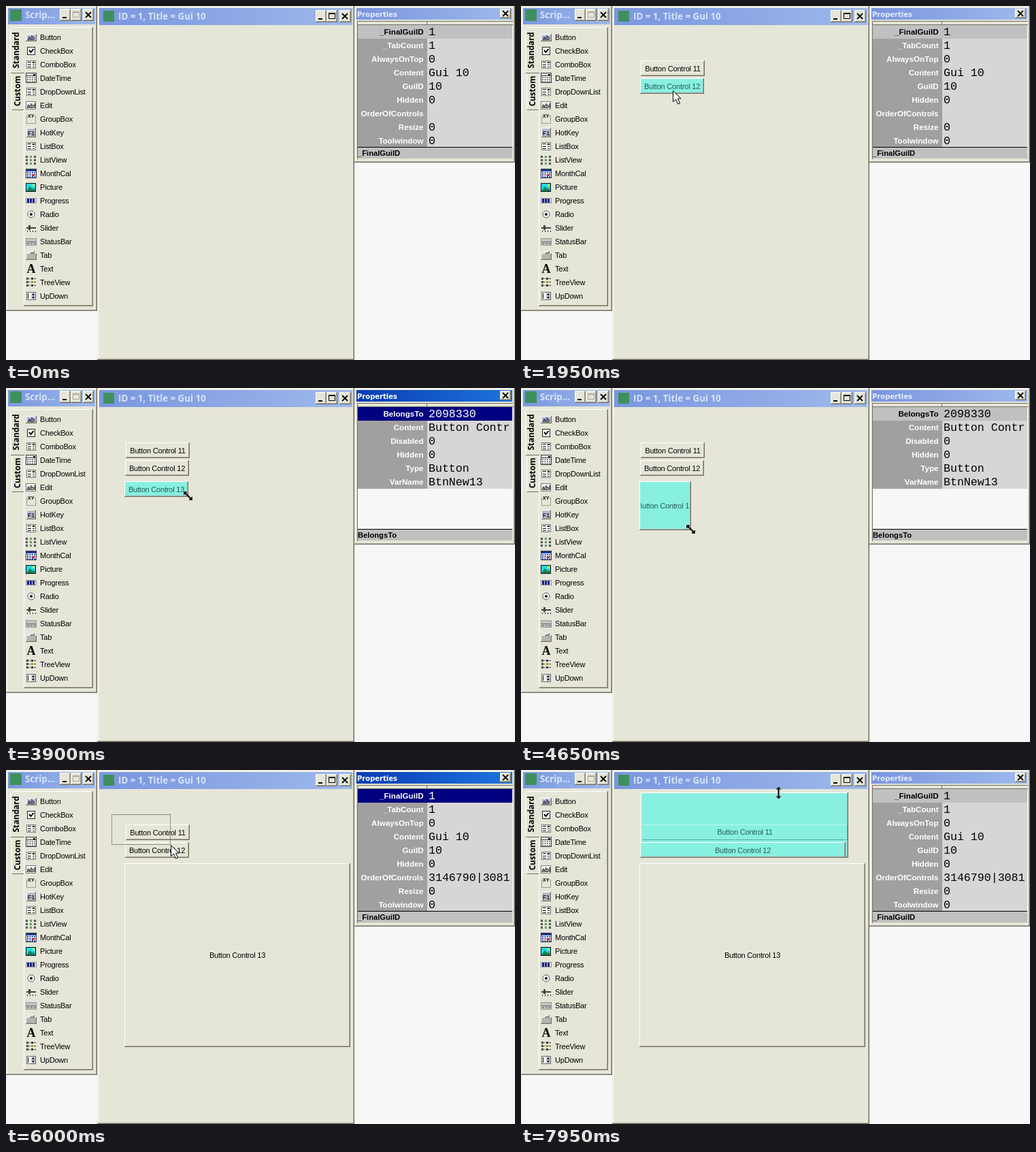
Write an HTML page with a canvas that moves like this. It is 748 px wide and 520 px high and loops after 8 s.

```html
<!DOCTYPE html>
<html lang="en">
<head>
<meta charset="utf-8">
<title>GUI builder</title>
<style>
html, body { margin: 0; width: 100%; height: 100%; overflow: hidden; background: #f7f7f7; }
canvas { display: block; width: 748px; height: 520px; }
</style>
</head>
<body>
<canvas id="stage" width="748" height="520"></canvas>
<script>
const ctx = document.getElementById('stage').getContext('2d');
const LOOP = 8000, STEP = 150;
const FACE = '#e6e6d8', LIGHT = '#fff', SHADE = '#aca899', DARK = '#716f64', CYAN = '#88f0e0';
const UI = '11px "Liberation Sans", sans-serif';
const CAPTION = 'bold 13.3px "Open Sans", sans-serif';
const SMALL = 'bold 10px "DejaVu Sans", sans-serif';
const LABEL = 'bold 11.6px "Liberation Sans", sans-serif';
const MONO = '16.6px "Liberation Mono", monospace';

function rect(x, y, w, h, color) {
  ctx.fillStyle = color;
  ctx.fillRect(x, y, w, h);
}

function frame(x, y, w, h, color) {
  ctx.strokeStyle = color;
  ctx.lineWidth = 1;
  ctx.strokeRect(x + 0.5, y + 0.5, w - 1, h - 1);
}

function text(s, x, y, font, color = '#000', align = 'left', spacing = '0px') {
  ctx.font = font;
  ctx.fillStyle = color;
  ctx.textAlign = align;
  ctx.letterSpacing = spacing;
  ctx.fillText(s, x, y);
}

const uiText = (s, x, y, color, align) => text(s, x, y, UI, color, align, '-0.2px');

function poly(points, fill, stroke) {
  ctx.beginPath();
  points.forEach(([x, y], i) => i ? ctx.lineTo(x, y) : ctx.moveTo(x, y));
  if (fill) { ctx.closePath(); ctx.fillStyle = fill; ctx.fill(); }
  if (stroke) { ctx.strokeStyle = stroke; ctx.lineWidth = 1; ctx.stroke(); }
}

function bevel(x, y, w, h, fill, inner = SHADE) {
  rect(x, y, w, h, DARK);
  rect(x, y, w - 1, h - 1, LIGHT);
  rect(x + 1, y + 1, w - 2, h - 2, inner);
  rect(x + 1, y + 1, w - 3, h - 3, fill);
}

function windowBox(x, y, w, h) {
  rect(x, y, w, h, DARK);
  rect(x, y, w - 1, h - 1, FACE);
  rect(x + 1, y + 1, w - 2, h - 2, SHADE);
  rect(x + 1, y + 1, w - 3, h - 3, LIGHT);
  rect(x + 2, y + 2, w - 4, h - 4, FACE);
}

function caption(x, y, w, h, active) {
  const g = ctx.createLinearGradient(x, 0, x + w, 0);
  g.addColorStop(0, active ? '#0a3cb4' : '#7a96df');
  g.addColorStop(1, active ? '#1c74dc' : '#9db9eb');
  rect(x, y, w, h, g);
}

function captionButton(x, y, w, h, kind, off) {
  bevel(x, y, w, h, FACE);
  const c = off ? SHADE : '#000', cx = x + (w >> 1), cy = y + (h >> 1);
  if (kind === 'min') rect(x + 4, y + h - 6, 6, 2, c);
  if (kind === 'max') {
    frame(cx - 5, cy - 5, 10, 9, c);
    rect(cx - 5, cy - 5, 10, 2, c);
  }
  if (kind === 'close') {
    ctx.lineWidth = 1.8;
    ctx.strokeStyle = c;
    ctx.beginPath();
    ctx.moveTo(cx - 4, cy - 4); ctx.lineTo(cx + 4, cy + 4);
    ctx.moveTo(cx + 4, cy - 4); ctx.lineTo(cx - 4, cy + 4);
    ctx.stroke();
  }
}

// Palette icons, each drawn in a 16 by 16 cell
function combo() {
  rect(1, 2, 14, 12, '#fff'); frame(1, 2, 14, 12, '#777');
  rect(9, 3, 5, 4, FACE); rect(10, 4, 3, 2, '#000');
  for (const y of [4, 8, 11]) rect(3, y, 5, 1, '#000');
  rect(10, 8, 3, 1, '#000'); rect(10, 11, 3, 1, '#000');
}

function grid(header) {
  rect(0, 1, 16, 14, '#fff'); frame(0, 1, 16, 14, '#333');
  rect(1, 2, 14, 3, header);
  for (let r = 0; r < 3; r++)
    for (let c = 0; c < 4; c++) rect(2 + c * 3.4, 6 + r * 3, 2, 2, header);
}

const palette = {
  Button() { bevel(0, 3, 16, 11, '#c4ccdc'); text('ab', 8, 12, 'bold 9px "Liberation Sans", sans-serif', '#113', 'center'); },
  CheckBox() {
    rect(2, 2, 12, 12, '#fff'); frame(2, 2, 12, 12, '#222');
    ctx.lineWidth = 2; ctx.strokeStyle = '#000';
    ctx.beginPath(); ctx.moveTo(5, 7); ctx.lineTo(7.5, 10); ctx.lineTo(11.5, 5); ctx.stroke();
  },
  ComboBox: combo,
  DateTime() { grid('#777'); rect(0, 0, 16, 5, '#ddd'); frame(0, 0, 16, 5, '#444'); rect(11, 2, 3, 2, '#000'); },
  DropDownList: combo,
  Edit() { rect(0, 2, 15, 12, '#fff'); frame(0, 2, 15, 12, '#777'); text('abl', 8, 12, 'bold 9px "Liberation Sans", sans-serif', '#000', 'center'); },
  GroupBox() {
    ctx.setLineDash([1, 1]); frame(1, 3, 14, 12, '#555'); ctx.setLineDash([]);
    rect(3, 0, 9, 6, FACE);
    text('XY', 3, 6, 'bold 7px "Liberation Sans", sans-serif');
  },
  HotKey() { bevel(1, 1, 14, 14, '#b8bcc8'); text('F1', 8, 12, 'bold 9px "Liberation Sans", sans-serif', '#224', 'center'); },
  ListBox: combo,
  ListView() {
    for (let r = 0; r < 3; r++)
      for (let c = 0; c < 3; c++) { rect(c * 6, 2 + r * 5, 3, 3, c === 1 ? '#484' : '#333'); rect(c * 6 + 1, 3 + r * 5, 1, 1, '#fff'); }
  },
  MonthCal() { grid('#1a3c9c'); rect(9, 9, 3, 3, '#d02020'); },
  Picture() {
    rect(0, 2, 15, 13, '#20d8e8'); frame(0, 2, 15, 13, '#111');
    poly([[1, 14], [6, 7], [10, 11], [12, 9], [14, 14]], '#168050');
    rect(10, 4, 3, 3, '#ffe840');
  },
  Progress() { rect(0, 4, 16, 8, '#d4d4d4'); frame(0, 4, 16, 8, '#999'); for (let i = 0; i < 3; i++) rect(2 + i * 4, 5, 3, 6, '#10208c'); },
  Radio() {
    ctx.beginPath(); ctx.arc(8, 8, 5, 0, 7); ctx.fillStyle = '#fff'; ctx.fill();
    ctx.strokeStyle = '#555'; ctx.lineWidth = 1; ctx.stroke();
    ctx.beginPath(); ctx.arc(8, 8, 2, 0, 7); ctx.fillStyle = '#000'; ctx.fill();
  },
  Slider() { rect(1, 7, 14, 2, '#444'); rect(4, 4, 3, 7, '#444'); for (let i = 0; i < 4; i++) rect(2 + i * 4, 12, 1, 2, '#222'); },
  StatusBar() { rect(0, 3, 16, 11, '#c4c4c4'); frame(0, 3, 16, 11, '#999'); rect(1, 8, 14, 1, '#666'); for (let i = 0; i < 3; i++) rect(2 + i * 5, 10, 3, 2, '#888'); },
  Tab() { bevel(0, 5, 16, 10, '#b4b4b4'); bevel(6, 2, 7, 4, '#b4b4b4'); },
  Text() { text('A', 8, 14, 'bold 18px "Liberation Serif", serif', '#000', 'center'); },
  TreeView() {
    for (let i = 0; i < 3; i++) {
      rect(1, 1 + i * 5, 3, 3, '#222'); rect(2, 2 + i * 5, 1, 1, '#fff');
      rect(5, 2 + i * 5, 2, 1, '#555'); rect(8, 1 + i * 5, 3, 3, i === 1 ? '#a90' : '#333'); rect(12, 2 + i * 5, 3, 1, '#333');
    }
  },
  UpDown() {
    rect(1, 2, 14, 12, '#fff'); frame(1, 2, 14, 12, '#666'); rect(3, 4, 1, 8, '#000'); rect(8, 3, 6, 10, '#ccd');
    poly([[9, 7], [13, 7], [11, 4]], '#000'); poly([[9, 9], [13, 9], [11, 12]], '#000');
  }
};

function upright(s, x, y) {
  ctx.save();
  ctx.translate(x, y);
  ctx.rotate(-Math.PI / 2);
  text(s, 0, 0, 'bold 11.7px "Open Sans", sans-serif', '#000', 'center');
  ctx.restore();
}

function drawPalette(active) {
  windowBox(0, 0, 134, 448);
  caption(3, 3, 128, 24, active);
  rect(6, 5, 17, 17, '#3f8f5c');
  text('Scrip...', 28, 18, CAPTION, active ? '#fff' : '#d8e4f8');
  captionButton(79, 4, 16, 18, 'min');
  captionButton(95, 4, 16, 18, 'max', true);
  captionButton(113, 4, 16, 18, 'close');

  bevel(26, 31, 102, 410, FACE);
  for (const [x, y, h, w] of [[8, 98, 55, 18], [6, 31, 68, 21]]) {
    rect(x, y + 1, w, h - 1, FACE);
    rect(x, y + 2, 1, h - 4, LIGHT);
    rect(x + 2, y, w - 2, 1, LIGHT);
    rect(x + 1, y + h - 1, w - 1, 1, DARK);
  }
  upright('Standard', 19, 65);
  upright('Custom', 21, 125);

  Object.entries(palette).forEach(([name, icon], i) => {
    const y = 46 + i * 20;
    ctx.save();
    ctx.translate(29, y - 8);
    icon();
    ctx.restore();
    uiText(name, 50, y + 4);
  });
}

function drawForm() {
  windowBox(134, 0, 378, 520);
  caption(137, 3, 372, 25, false);
  rect(143, 7, 16, 16, '#3f8f5c');
  text('ID = 1, Title = Gui 10', 165, 20, CAPTION, '#d8e4f8');
  captionButton(455, 6, 16, 18, 'min');
  captionButton(471, 6, 16, 18, 'max');
  captionButton(490, 6, 17, 18, 'close');
}

function drawProperties(rows, active, focused) {
  windowBox(512, 0, 236, 230);
  caption(515, 3, 229, 17, active);
  text('Properties', 516, 16, SMALL, active ? '#fff' : '#e4ecfa');
  captionButton(726, 4, 16, 14, 'close');
  rect(516, 22, 229, 186, '#f7f7f7');
  rect(516, 22, 229, 5, FACE);
  rect(516, 22, 229, 1, DARK);
  rect(618, 23, 1, 4, DARK);
  rect(516, 27, 229, 1, DARK);
  rect(516, 22, 1, 203, DARK);
  ctx.save();
  ctx.beginPath();
  ctx.rect(517, 28, 227, 180);
  ctx.clip();
  rows.forEach(([name, value], i) => {
    const y = 28 + i * 20;
    rect(517, y, 102, 20, '#a0a0a0');
    rect(619, y, 125, 20, '#d6d6d6');
    if (!i) rect(517, y, 227, 20, focused ? '#000080' : '#c0c0c0');
    text(name, 613.5, y + 14, LABEL, i || focused ? '#fff' : '#000', 'right');
    text(value, 621, y + 15, MONO, !i && focused ? '#fff' : '#000');
  });
  ctx.restore();
  rect(517, 208, 227, 16, '#c0c0c0');
  rect(517, 207, 227, 1, '#000');
  text(rows[0][0], 517, 220, 'bold 11.2px "Liberation Sans", sans-serif');
}

function guiRows(order) {
  return [['_FinalGuiID', '1'], ['_TabCount', '1'], ['AlwaysOnTop', '0'], ['Content', 'Gui 10'], ['GuiID', '10'],
    ['Hidden', '0'], ['OrderOfControls', order], ['Resize', '0'], ['Toolwindow', '0']];
}
const buttonRows = [['BelongsTo', '2098330'], ['Content', 'Button Contr'], ['Disabled', '0'], ['Hidden', '0'],
  ['Type', 'Button'], ['VarName', 'BtnNew13']];

function control(n, x, y, right, bottom, selected) {
  const w = right - x, h = bottom - y;
  bevel(x, y, w, h, selected ? CYAN : FACE, selected ? '#a8a49c' : SHADE);
  ctx.save();
  ctx.beginPath();
  ctx.rect(x + 2, y + 2, w - 4, h - 4);
  ctx.clip();
  uiText('Button Control ' + n, x + w / 2, y + h / 2 + 4, selected ? '#235c58' : '#000', 'center');
  ctx.restore();
}

function arrow(x, y) {
  poly([[0, 0], [0, 16], [4, 12.5], [7, 19.5], [10, 18.5], [7, 11.5], [11.5, 11.5]]
    .map(([a, b]) => [x + a + 0.5, y + b + 0.5]), '#fff');
  ctx.strokeStyle = '#000';
  ctx.lineWidth = 1;
  ctx.stroke();
}

function sizer(x, y, angle) {
  ctx.save();
  ctx.translate(x + 0.5, y + 0.5);
  ctx.rotate(angle);
  const half = [[0, -9], [4, -5], [1, -5], [1, 5], [4, 5], [0, 9]];
  const shape = half.concat(half.slice(1, 5).reverse().map(([a, b]) => [-a, b]));
  poly(shape, '#000');
  ctx.strokeStyle = '#fff';
  ctx.lineWidth = 0.8;
  ctx.stroke();
  poly(shape, '#000');
  ctx.restore();
}

// Pointer path: time, x, y
const path = [
  [150, 500, 209], [600, 70, 48], [750, 66, 48], [1050, 224, 98], [1200, 224, 98],
  [1500, 66, 48], [1650, 68, 48], [1800, 235, 118], [1950, 223, 124], [2100, 223, 124],
  [2550, 64, 48], [2700, 64, 48], [3000, 258, 146], [3150, 222, 155], [3300, 222, 155],
  [3750, 267, 158], [3900, 267, 158], [4200, 420, 356], [4650, 249, 207], [4950, 505, 405],
  [5250, 383, 73], [5700, 155, 65], [6150, 285, 133], [6450, 285, 134], [6750, 267, 121],
  [7200, 460, 122], [7350, 475, 121], [7650, 378, 79], [7950, 378, 33]
];

function pointer(t) {
  const i = Math.max(1, path.findIndex(p => p[0] >= t));
  const [t0, x0, y0] = path[i - 1], [t1, x1, y1] = path[i];
  const k = (t - t0) / (t1 - t0);
  return [Math.round(x0 + (x1 - x0) * k), Math.round(y0 + (y1 - y0) * k)];
}

const within = (t, a, b) => t >= a && t < b;

function drawControls(t, x, y) {
  const pair = t >= 6450;
  if (t >= 900) {
    const drag = t < 1050, bx = drag ? x - 48 : 176, by = drag ? y - 18 : 80;
    const grow = t >= 6900 ? Math.min(210, Math.max(0, (t < 7350 ? x : 475) - 266)) : 0;
    const right = bx + 94 + grow;
    if (t >= 7800) {
      bevel(176, y, 305, 129 - y, CYAN, '#a8a49c');
      rect(178, 80, 302, 1, '#b4f8f0');
      rect(178, 102, 302, 1, '#58a8a0');
      rect(479, 80, 1, 23, '#58a8a0');
      uiText('Button Control 11', 329, 95, '#235c58', 'center');
    } else {
      control(11, bx, by, right, by + 23, pair || t < 1500);
    }
  }
  if (t >= 1800) {
    const drag = t < 1950, bx = drag ? x - 48 : 175, by = drag ? y - 18 : 106;
    const right = t >= 6900 ? (t < 7350 ? x + 2 : 477) : bx + 94;
    if (pair) rect(177, 103, right - 178, 3, CYAN);
    control(12, bx, by, right, by + 23, pair || t < 2550);
  }
  if (t >= 2850) {
    const drag = t < 3150, bx = drag ? x - 48 : 174, by = drag ? y - 18 : 137;
    let right = bx + 94, bottom = by + 23;
    if (t >= 4050) [right, bottom] = t < 4950 ? [x + 1, y + 2] : [506, 407];
    control(13, bx, by, right, bottom, t < 5250);
  }
}

function draw(t) {
  const [x, y] = t ? pointer(t) : [0, 0];
  const bound = within(t, 3300, 5250);
  const active = within(t, 3300, 4050) || within(t, 5250, 6900);
  const focused = active && !within(t, 5400, 5700);

  rect(0, 0, 748, 520, '#f7f7f7');
  drawPalette(within(t, 600, 900) || within(t, 1500, 1800) || within(t, 2550, 2850));
  drawForm();
  drawControls(t, x, y);
  drawProperties(bound ? buttonRows : guiRows(t < 5250 ? '' : '3146790|3081'), active, focused);

  if (within(t, 5850, 6450)) {
    ctx.setLineDash([1, 1]);
    frame(155, 65, x - 155, y - 65, '#333');
    ctx.setLineDash([]);
  }
  if (!t) return;
  if (within(t, 3750, 5100) || within(t, 6750, 7500)) sizer(x, y, -Math.PI / 4);
  else if (t >= 7650) sizer(x, y, 0);
  else arrow(x, y);
}

let shown = -1;
const start = performance.now();
function tick() {
  const t = Math.floor((performance.now() - start) % LOOP / STEP) * STEP;
  if (t !== shown) draw(shown = t);
  requestAnimationFrame(tick);
}
tick();
</script>
</body>
</html>
```
